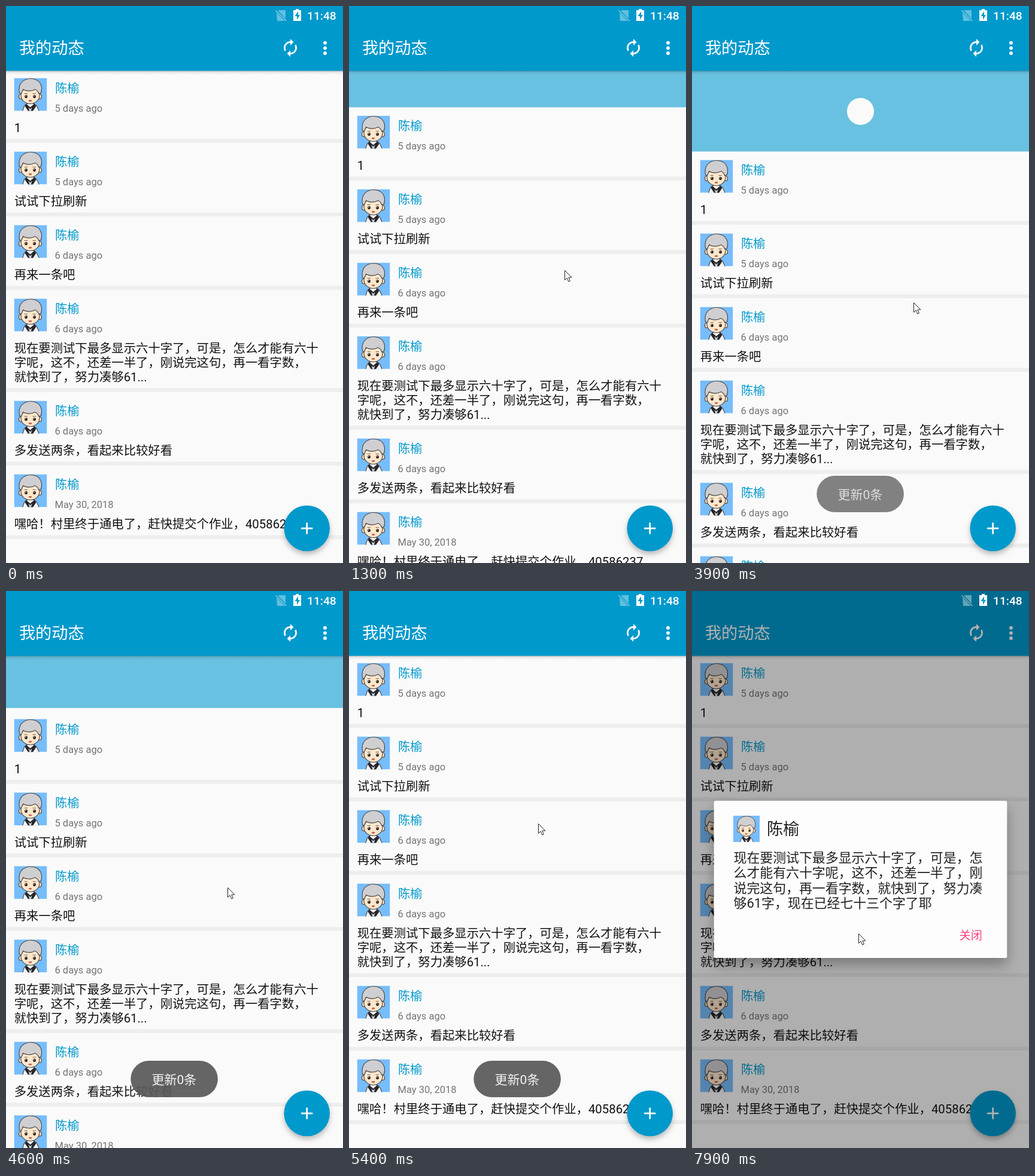
Animation, 563 px wide and 932 px high, one loop 8000 ms. Source, as an HTML page with a canvas:

```html
<!DOCTYPE html>
<html lang="zh-CN">
<head>
<meta charset="utf-8">
<title>我的动态</title>
<style>
html, body { margin: 0; width: 100%; height: 100%; overflow: hidden; background: #fafafa; }
canvas { display: block; width: 563px; height: 932px; }
</style>
</head>
<body>
<canvas id="stage"></canvas>
<script>
const W = 563, H = 932, LOOP = 8000, STEP = 100;
const BLUE = '#0099cc', PAPER = '#fafafa', SKY = '#68c1e0';
const TOP = 106.5, HEAD = 137, MID = 281.5, BALL = 22.6, RING = 2.9, REST = 164.6;
const FONT = 'Roboto, "Noto Sans CJK SC", "Noto Sans CJK", sans-serif';
const AUTHOR = '陈榆';

const canvas = document.getElementById('stage');
const ratio = window.devicePixelRatio || 1;
canvas.width = W * ratio;
canvas.height = H * ratio;
const ctx = canvas.getContext('2d');

const posts = [
  ['5 days ago', '1'],
  ['5 days ago', '试试下拉刷新'],
  ['6 days ago', '再来一条吧'],
  ['6 days ago', '现在要测试下最多显示六十字了，可是，怎么才能有六十',
    '字呢，这不，还差一半了，刚说完这句，再一看字数，', '就快到了，努力凑够61...'],
  ['6 days ago', '多发送两条，看起来比较好看'],
  ['May 30, 2018', '嘿哈！村里终于通电了，赶快提交个作业，40586237']
];
const detail = ['现在要测试下最多显示六十字了，可是，怎', '么才能有六十字呢，这不，还差一半了，刚',
  '说完这句，再一看字数，就快到了，努力凑', '够61字，现在已经七十三个字了耶'];

// time, value...
const pull = [[700, 0], [800, 3], [900, 12], [1100, 36], [1200, 48], [1300, 63],
  [1400, 88], [1500, 114], [1600, HEAD]];
const pointer = [[300, 352, 74], [800, 352, 360], [1300, 360, 442], [1700, 370, 507],
  [1800, 370, 496], [5000, 370, 496], [5300, 335, 430], [5900, 218, 182],
  [6200, 218, 182], [6300, 218, 176], [6600, 218, 176], [6900, 212, 300], [7300, 278, 573]];
const wave = [[0, 0], [.2, 0], [.4, 1], [.6, 0], [.8, .4], [1, 0]];

const clamp = v => Math.max(0, Math.min(1, v));

function track(keys, t) {
  if (t <= keys[0][0]) return keys[0].slice(1);
  for (let i = 1; i < keys.length; i++) {
    const a = keys[i - 1], b = keys[i];
    if (t <= b[0]) {
      const k = (t - a[0]) / (b[0] - a[0]);
      return a.slice(1).map((v, j) => v + (b[j + 1] - v) * k);
    }
  }
  return keys[keys.length - 1].slice(1);
}

function text(str, x, y, size, color, weight = 400) {
  ctx.font = `${weight} ${size}px ${FONT}`;
  ctx.fillStyle = color;
  ctx.fillText(str, x, y);
}

function rect(x, y, w, h, color) {
  ctx.fillStyle = color;
  ctx.fillRect(x, y, w, h);
}

function ellipse(x, y, rx, ry, color, line) {
  ctx.beginPath();
  ctx.ellipse(x, y, rx, ry, 0, 0, Math.PI * 2);
  ctx.fillStyle = color;
  ctx.fill();
  if (line) ctx.stroke();
}

const disc = (x, y, r, color) => ellipse(x, y, r, r, color);

function shape(path, color, line) {
  const p = new Path2D(path);
  ctx.fillStyle = color;
  ctx.fill(p);
  if (line) ctx.stroke(p);
}

function shadow(blur, dy, alpha) {
  ctx.shadowColor = `rgba(0,0,0,${alpha})`;
  ctx.shadowBlur = blur * ratio;
  ctx.shadowOffsetY = dy * ratio;
}

function avatar(x, y, size) {
  ctx.save();
  ctx.translate(x, y);
  ctx.scale(size / 55, size / 55);
  ctx.beginPath();
  ctx.rect(0, 0, 55, 55);
  ctx.clip();
  rect(0, 0, 55, 55, '#76bdfb');
  ctx.strokeStyle = '#4a4344';
  ctx.lineWidth = 1.1;
  shape('M14 56L17 47Q20 42 27 42Q35 42 38 47L42 56Z', '#f4f4f2', true);
  shape('M20 43L27 49L34 43L37 47L31 56H24L18 47Z', '#25262b');
  shape('M24 49L27 52L30 49L28 56H26Z', '#d9d9dd');
  ellipse(11, 31, 3, 4, '#f6dcbc', true);
  ellipse(43, 31, 3, 4, '#f6dcbc', true);
  ellipse(27, 29, 15.5, 14, '#fbe7cc', true);
  shape('M9 25C6 9 16 1 28 1C41 1 49 11 45 25L41 26C40 22 37 20 35 19C28 23 20 22 15 19L12 26Z', '#cfced1', true);
  for (const ex of [20, 34]) {
    ellipse(ex, 31, 2.4, 2.8, '#35241f');
    disc(ex - .7, 30, .8, '#ffffff');
    rect(ex - 3, 25.5, 5.5, .9, '#6b5548');
  }
  ellipse(27, 38, 2.8, 1.4, '#c2604f');
  ctx.restore();
}

function list(offset) {
  let top = TOP + offset;
  for (const [date, ...lines] of posts) {
    const a = top + 14;
    avatar(13.5, a, 55);
    text(AUTHOR, 82, a + 24.5, 20.33, BLUE);
    text(date, 81.5, a + 56.5, 16.5, '#757575');
    lines.forEach((s, i) => text(s, 13.7, a + 90.5 + i * 24, 20.33, '#111'));
    top += 123 + (lines.length - 1) * 24;
    rect(0, top - 7, W, 6.5, '#eeeeee');
  }
}

// Hump that meets the bottom edge of the header
function hump(half, y, rise) {
  ctx.beginPath();
  ctx.moveTo(MID - half, y);
  ctx.quadraticCurveTo(MID, y - rise, MID + half, y);
  ctx.fillStyle = PAPER;
  ctx.fill();
}

function ring(radius, from, sweep, alpha) {
  ctx.beginPath();
  ctx.arc(MID, REST, radius, from, from + sweep);
  ctx.strokeStyle = `rgba(250,250,250,${alpha})`;
  ctx.lineWidth = RING;
  ctx.stroke();
}

function spinner(t) {
  const n = (t - 2650) * .06, grow = 270 / 7;
  const up = Math.min(n, grow), down = Math.max(0, n - grow);
  const start = 90 + up * 3 + down * 10;
  ring(BALL + RING * 2, start * Math.PI / 180, (up - down) * 7 * Math.PI / 180, 1);
}

function finish(t, floor) {
  const k = (t - 3654) / 800;
  if (k < .3) {
    const f = k / .3;
    disc(MID, REST, BALL, PAPER);
    ring(BALL + RING * 2 * (1 + f), 0, Math.PI * 2, 1 - f);
  } else if (k < .7) {
    disc(MID, TOP + HEAD / 2 * (1 + (k - .3) / .4), BALL, PAPER);
  } else if (k < 1) {
    const f = (k - .7) / .3;
    hump(BALL * (1 + 2 * f), floor, BALL * (1 - f));
  }
}

function header(t, offset) {
  const floor = TOP + offset - (t > 4460 ? 4.5 : 0);
  if (floor <= 108) return;
  ctx.save();
  ctx.beginPath();
  ctx.rect(0, 108, W, floor - 108);
  ctx.clip();
  rect(0, 108, W, H, SKY);
  if (t >= 1600 && t <= 2600) {
    const k = (t - 1605) / 1000, lift = track(wave, k)[0];
    hump(W / 2, floor, lift * HEAD);
    if (k < .4 && lift > 0) {
      const y = floor - lift * HEAD / 2;
      if (lift < .9) hump(BALL * (4 - 3 * lift), y, BALL * lift * 2);
      else disc(MID, y, BALL, PAPER);
    }
  }
  if (t >= 2100 && t < 3654) disc(MID, REST, BALL, PAPER);
  if (t >= 2700 && t < 3654) spinner(t);
  if (t >= 3654) finish(t, floor);
  ctx.restore();
}

function appBar() {
  const fade = ctx.createLinearGradient(0, 108, 0, 115);
  fade.addColorStop(0, 'rgba(0,0,0,.28)');
  fade.addColorStop(.4, 'rgba(0,0,0,.08)');
  fade.addColorStop(1, 'rgba(0,0,0,0)');
  rect(0, 108, W, 7, fade);
  rect(0, 0, W, 108.5, BLUE);
  text('我的动态', 21.9, 80, 27.2, '#fff');
  ctx.save();
  ctx.translate(458.6, 53.6);
  ctx.scale(1.3685, 1.3685);
  shape('M12 6v3l4-4-4-4v3c-4.42 0-8 3.58-8 8 0 1.57.46 3.03 1.24 4.26L6.7 14.8c-.45-.83-.7-1.79-.7-2.8 0-3.31 2.69-6 6-6zm6.76 1.74L17.3 9.2c.44.84.7 1.79.7 2.8 0 3.31-2.69 6-6 6v-3l-4 4 4 4v-3c4.42 0 8-3.58 8-8 0-1.57-.46-3.03-1.24-4.26z', '#fff');
  ctx.restore();
  for (const y of [61.7, 70.3, 78.9]) disc(533, y, 2.9, '#fff');
}

function statusBar() {
  shape('M457 7H467V21L454 7.5ZM452 11L466 25H453Z', 'rgba(255,255,255,.38)');
  ctx.beginPath();
  ctx.moveTo(450.5, 7.5);
  ctx.lineTo(468.5, 25);
  ctx.strokeStyle = 'rgba(255,255,255,.5)';
  ctx.lineWidth = 1.5;
  ctx.stroke();
  shape('M484 5H489V7H493V25H480V7H484Z', '#fff');
  shape('M488 9L482.5 17H486V23L491 15H488Z', BLUE);
  text('11:48', 503, 23, 19.2, '#fff', 500);
}

function addButton() {
  ctx.save();
  shadow(9, 5, .26);
  disc(502.7, 874, 38.3, BLUE);
  ctx.restore();
  rect(493.1, 872.7, 19.2, 2.7, '#fff');
  rect(501.35, 864.4, 2.7, 19.2, '#fff');
}

function toast(t) {
  const alpha = clamp((t - 3550) / 430) * clamp(1 - (t - 5450) / 430);
  if (!alpha) return;
  ctx.save();
  ctx.globalAlpha = alpha;
  ctx.beginPath();
  ctx.roundRect(208.3, 786, 145.6, 61, 30.5);
  ctx.fillStyle = 'rgba(90,90,90,.93)';
  ctx.fill();
  text('更新0条', 243.5, 824.7, 21, '#f4f4f4');
  ctx.restore();
}

function dialog() {
  rect(0, 0, W, H, 'rgba(0,0,0,.3)');
  ctx.save();
  shadow(22, 12, .3);
  ctx.beginPath();
  ctx.roundRect(36.7, 351, 489.6, 263, 2.7);
  ctx.fillStyle = '#fdfdfd';
  ctx.fill();
  ctx.restore();
  avatar(69, 376, 44);
  text(AUTHOR, 125, 408, 27.2, '#212121');
  detail.forEach((s, i) => text(s, 69.5, 453.9 + i * 25.5, 21.9, '#212121'));
  text('关闭', 446.5, 583, 19.2, '#ff4081');
}

function arrow(t) {
  if (t < 300) return;
  const [x, y] = track(pointer, t).map(Math.round);
  ctx.save();
  ctx.translate(x + .5, y + .5);
  ctx.strokeStyle = '#20222e';
  ctx.lineWidth = 1;
  shape('M0 0V16L3.7 12.6L6.3 18.6L8.8 17.5L6.3 11.6H11.4Z', '#fff', true);
  ctx.restore();
}

function draw(t) {
  ctx.setTransform(ratio, 0, 0, ratio, 0, 0);
  rect(0, 0, W, H, PAPER);
  const back = 1 - clamp((t - 4460) / 809);
  const offset = track(pull, t)[0] * back * back;
  header(t, offset);
  list(offset);
  appBar();
  addButton();
  toast(t);
  if (t >= 7900) dialog();
  statusBar();
  arrow(t);
}

const begin = performance.now();
function tick() {
  const t = (performance.now() - begin) % LOOP;
  draw(Math.floor(t / STEP) * STEP);
  requestAnimationFrame(tick);
}
tick();
</script>
</body>
</html>
```
